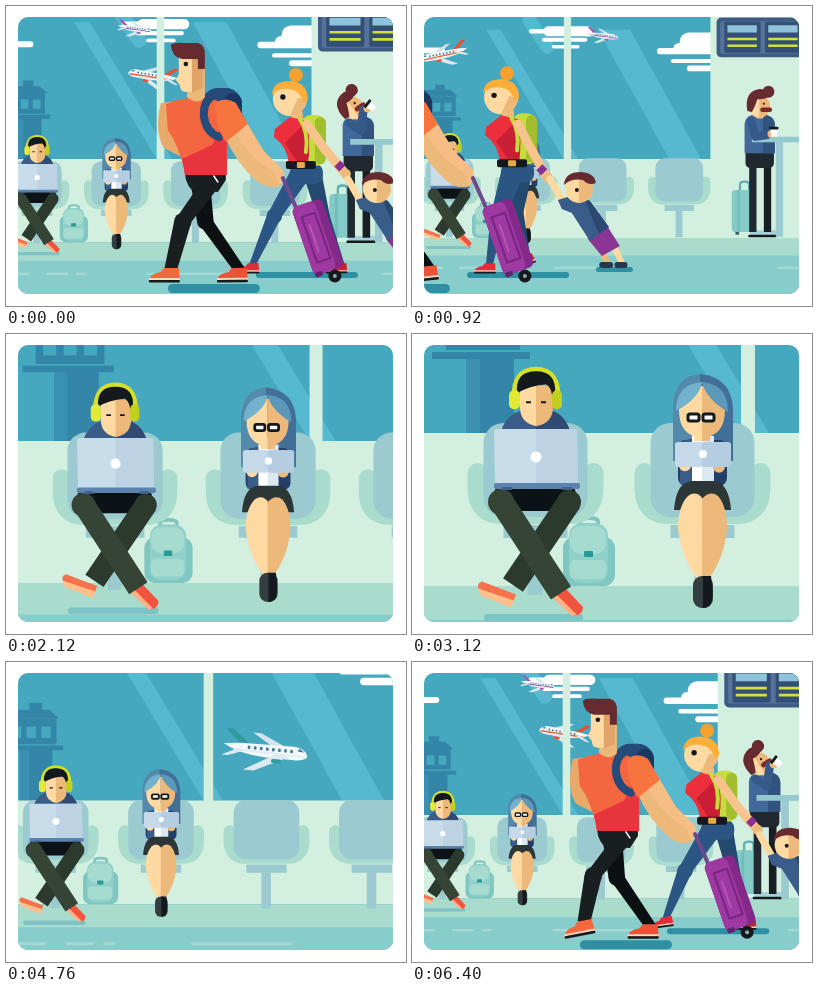
Animation, 400 px wide and 300 px high, one loop 6.44 s. Source, as an HTML page with a canvas:

```html
<!DOCTYPE html>
<html>
<head>
<meta charset="utf-8">
<title>Departure hall</title>
<style>
html, body { margin: 0; width: 100%; height: 100%; overflow: hidden; background: #fff; }
canvas { display: block; width: 400px; height: 300px; }
</style>
</head>
<body>
<canvas id="stage" width="400" height="300"></canvas>
<script>
const g = document.getElementById('stage').getContext('2d');
const LOOP = 6440, TAU = Math.PI * 2;
const { cos, sin, max, min } = Math;
const LIGHT = '#ffd9a2', TAN = '#ecb97a', BLACK = '#14191d', NAVY = '#3a5c88',
  WALL = '#d3efe0', MINT = '#a9dccd', CHAIR = '#9bcbd0', MAROON = '#672a2e', SHADE = '#2f8fa3';

// Drawing helpers
const fill = (c, d) => { g.fillStyle = c; g.fill(new Path2D(d)); };
const line = (c, w, d, cap = 'round') => {
  g.strokeStyle = c; g.lineWidth = w; g.lineCap = cap; g.lineJoin = 'round';
  g.stroke(new Path2D(d));
};
const box = (c, x, y, w, h, r = 0) => {
  g.fillStyle = c; g.beginPath(); g.roundRect(x, y, w, h, r); g.fill();
};
const dot = (c, x, y, r) => {
  g.fillStyle = c; g.beginPath(); g.arc(x, y, r, 0, TAU); g.fill();
};
const at = (x, y, draw, sx = 1, sy = sx, turn = 0) => {
  g.save(); g.translate(x, y); g.rotate(turn); g.scale(sx, sy); draw(); g.restore();
};
const mix = (a, b, p) => a + (b - a) * p;
const ease = (a, b, v) => { const p = min(1, max(0, (v - a) / (b - a))); return p * p * (3 - 2 * p); };

// Smooth cyclic tracks through the camera stops
const STOPS = [0, 920, 2120, 3120, 4080, 5480];
function track(v, t) {
  const n = STOPS.length;
  const time = i => STOPS[(i + n) % n] + LOOP * Math.floor(i / n);
  const value = i => v[(i + n) % n];
  const slope = i => (value(i + 1) - value(i)) / (time(i + 1) - time(i));
  const tangent = i => {
    const a = slope(i - 1), b = slope(i);
    return a * b > 0 ? 2 * a * b / (a + b) : 0;
  };
  let i = n - 1;
  while (STOPS[i] > t) i--;
  const h = time(i + 1) - time(i), p = (t - time(i)) / h, q = 1 - p;
  return value(i) * q * q * (1 + 2 * p) + value(i + 1) * p * p * (3 - 2 * p)
    + h * p * q * (tangent(i) * q - tangent(i + 1) * p);
}
const CAM = {
  wallS: [.545, .516, .928, 1, .837, .562],
  wallX: [-28.6, -17.9, -1.8, 0, -12.7, -33.8],
  wallY: [99, 101.9, 15.1, 0, 36.1, 96.4],
  skyX: [-20, -12, -1.8, 0, -20, -24],
  seatS: [.475, .4585, .916, 1, .809, .5],
  seatX: [-27.7, -19.1, -4.1, 0, -16.4, -35.5],
  seatY: [113, 111.5, 17, 0, 42, 110]
};

// Outside
function plane(paint, trim) {
  fill('#d5e4ec', 'M8-7L-22-25L-10-25L30-7Z');
  fill(trim, 'M-38-6L-62-27L-51-28L-26-8Z');
  fill('#f4f8f9', 'M61 3Q58-9 40-10L-38-8L-64-5Q-40 9 0 10L42 10Q58 9 61 3Z');
  line(paint, 3.5, 'M-48 2L57 4', 'butt');
  fill('#3f86a8', 'M48-8L56-3L46-3Z');
  for (let x = -28; x < 42; x += 9) box('#457a9d', x, -5, 4, 5, 1.5);
  fill('#dceaf0', 'M14 4L-32 31L-16 31L34 6Z');
  box(trim, 8, 11, 15, 6, 3);
  fill('#dceaf0', 'M-42 0L-66 12L-56 12L-30 2Z');
}
function tower() {
  const c = '#3486a8';
  box(c, 54, 20, 48, 90);
  box('#3a90b1', 54, 25, 14, 85);
  box(c, 68, -45, 19, 14);
  fill(c, 'M30-22L46-35L98-35L112-22Z');
  box(c, 34, -22, 74, 12);
  for (let x = 34; x < 108; x += 22) box(c, x, -12, 8, 24);
  box(c, 34, 7, 74, 9);
  box(c, 20, 18, 98, 7);
}
function clouds() {
  const bar = (x, y, w, h) => box('#fff', x, y, w, h, h / 2);
  bar(278, -158, 95, 19); bar(250, -153, 80, 9);
  bar(275, -136, 88, 8); bar(294, -122, 54, 7);
  bar(542, -146, 100, 36); bar(530, -126, 100, 20);
  bar(498, -116, 130, 12); bar(525, -95, 100, 8); bar(556, -82, 80, 11);
  bar(-40, -117, 127, 11);
}
function sky(t, u) {
  clouds();
  tower();
  at(273 + 130 * u, -140, () => plane('#8c4ba8', '#a555b5'), .5, .5, .12);
  const size = .74 - .2 * min(u, 0);
  at(306 - 240 * u, -53 - 55 * u, () => plane('#ef5a35', '#e8502f'),
    -size, size, .17 - .4 * max(0, u));
  const w = (t - 4080) / 1000;
  at(251 + 245 * w, -5 + 45 * w, () => plane('#e4eff3', '#2f9b9f'), 1, 1, .1);
}
function glints() {
  const c = '#56b9cf';
  fill(c, 'M178-152L206-152L357 99L329 99Z');
  fill(c, 'M395-152L457-152L595 99L533 99Z');
  line(c, 26, 'M262-170L297-118');
}

// Hall
function bag() {
  line('#80c4c0', 4, 'M168 192V187Q168 184 177 184Q186 184 186 187V192');
  box('#80c6c2', 151, 203, 52, 49, 11);
  box('#8fd0c8', 157, 189, 39, 60, 13);
  box('#a6dbcf', 158, 192, 36, 28, 11);
  box('#a6dbcf', 158, 226, 36, 19, 5);
  box('#279b96', 172, 217, 9, 6, 1);
}
function sign(t) {
  box('#3e5b83', 625, -175, 190, 77, 9);
  box('#557399', 632, -168, 183, 63, 4);
  const late = t > 5000 && t < 5950;
  for (const x of [640, 719]) {
    box('#344f76', x, -167, 70, 60, 3);
    box('#8fc3dc', x + 6, -160, 57, 14);
    box(late ? '#e33443' : '#d5df3a', x + 6, -136, 57, 5);
    box('#d5df3a', x + 6, -123, 57, 5);
  }
}
function hall(t) {
  box(WALL, 329, -250, 14, 360);
  box(WALL, 613, -250, 500, 360);
  box(WALL, -200, 99, 1300, 153);
  box(MINT, -200, 252, 1300, 35);
  box('#89cccc', -200, 286, 1300, 300);
  for (const [x, w] of [[-20, 116], [126, 41], [181, 18], [310, 150], [741, 80]])
    box('#a5dad4', x, 308, w, 4, 2);
  sign(t);
  bag();
}
function seat(x) {
  at(x, 0, () => {
    box(CHAIR, -8, 200, 15, 61);
    box(CHAIR, -32, 191, 64, 13);
    line(MINT, 20, 'M-58 139V154Q-58 180-33 180H33Q58 180 58 154V139');
    box(CHAIR, -52, 89, 104, 94, 20);
  });
}
function listener(t) {
  const nod = sin(t / LOOP * TAU * 10), tap = 3 * sin(t / LOOP * TAU * 5);
  box('#7fc3c6', 72, 280, 99, 7, 3.5);
  at(0, tap, () => {
    fill('#f4724c', 'M70 246L104 259L101 267L67 254Q64 248 70 246Z');
    fill('#ffc08c', 'M66 253L102 265L99 272L69 260Z');
  });
  fill('#f0543f', 'M141 264L153 254L171 273Q171 281 162 282Z');
  fill('#ffb184', 'M141 264L145 261L165 281L160 282Z');
  box('#0d1216', 82, 150, 82, 27, 10);
  line('#2c3a2d', 24, 'M158 167L101 251', 'butt');
  dot('#2c3a2d', 157, 168, 12);
  line('#354434', 24, 'M89 167L149 259', 'butt');
  dot('#354434', 89, 168, 13);
  fill(NAVY, 'M88 100Q94 79 112 76H137Q153 79 159 100Z');
  fill('#2f4b74', 'M124 76H137Q153 79 159 100H124Z');
  at(0, nod, () => {
    fill(LIGHT, 'M108 52H125V93Q108 90 108 74Z');
    fill(TAN, 'M124 52H141V74Q141 90 124 93Z');
    line('#d5df27', 5, 'M102 66Q101 36 124 36Q147 36 146 66');
    fill(BLACK, 'M105 60Q103 38 124 38Q145 38 143 61L140 62Q139 54 134 51Q116 53 105 60Z');
    box('#e2ea36', 97, 57, 11, 19, 5);
    box('#c3cf1d', 140, 57, 10, 19, 5);
    line(BLACK, 2, 'M114 69H119M129 69H134', 'butt');
  });
  fill('#c8dcea', 'M82 97Q82 95 85 95L163 95Q165 95 165 98L166 150H83Z');
  fill('#bdd3e4', 'M124 95H163Q165 95 165 98L166 150H124Z');
  dot('#fff', 124, 123, 5.5);
  box('#5b83ad', 82, 149, 86, 6, 2);
  box('#3d628d', 90, 153, 10, 3);
  box('#3d628d', 150, 153, 10, 3);
}
function reader(t) {
  fill('#5389ab', 'M261 127V72Q263 40 291 40V127Z');
  fill('#426f98', 'M288 40Q319 43 321 74V127H288Z');
  box('#233f68', 266, 106, 49, 46, 8);
  fill(NAVY, 'M268 150V112Q270 105 283 104L280 150Z');
  box('#fff', 280, 102, 11, 50);
  box('#dbe8ef', 290, 102, 12, 50);
  box(LIGHT, 282, 94, 9, 13);
  box(TAN, 290, 94, 8, 13);
  fill(LIGHT, 'M267 76Q267 53 290 52V104Q267 102 267 76Z');
  fill(TAN, 'M290 52Q313 53 313 76Q313 102 290 104Z');
  fill('#72b2cc', 'M264 77Q264 50 290 48Q288 64 264 77Z');
  fill('#5b98b9', 'M290 48Q316 50 316 78Q294 65 290 48Z');
  g.strokeStyle = BLACK; g.lineWidth = 3;
  for (const x of [276, 291]) {
    g.fillStyle = '#fff'; g.beginPath(); g.roundRect(x, 80, 11, 7, 2); g.fill(); g.stroke();
  }
  fill('#2d3636', 'M262 176Q264 148 280 147H302Q317 149 319 176Z');
  fill(LIGHT, 'M291 165Q284 156 276 162Q266 172 266 195Q270 226 287 247H291Z');
  fill(TAN, 'M290 165Q298 156 306 162Q315 172 315 195Q312 226 295 247H290Z');
  box('#343d40', 281, 242, 20, 32, 9);
  fill(BLACK, 'M291 242H299Q301 256 300 266Q298 274 291 274Z');
  const tap = sin(t / LOOP * TAU * 12) * .7;
  dot(LIGHT, 273, 132 + tap, 6);
  dot(TAN, 307, 132 - tap, 6);
  box('#c5d9e8', 263, 108, 28, 25, 3);
  box('#b4cde0', 290, 108, 29, 25, 3);
  dot('#fff', 291, 120, 4);
}
function drinker(u) {
  const p = ease(-.75, -.3, u) * (1 - ease(.35, .75, u));
  line('#5fb0b5', 2.5, 'M343 190V183Q343 180 348 180Q353 180 353 183V190');
  box('#84cac8', 334, 189, 24, 46, 4);
  box('#73bcbd', 340, 189, 3, 46);
  box('#3a5d6c', 338, 235, 4, 3);
  box('#a8d0dc', 354, 233, 15, 6, 2);
  box('#a8d0dc', 369, 233, 15, 6, 2);
  box(BLACK, 352, 238, 31, 2.5, 1);
  box('#20292f', 353, 155, 8, 80);
  box('#171f25', 369, 155, 8, 80);
  box('#20292f', 349, 145, 31, 20, 5);
  fill('#41689a', 'M348 149V117Q349 107 360 107H370Q380 108 381 118V149Z');
  fill('#31547f', 'M368 107Q381 108 381 118V149H368Z');
  at(364 - 4 * p, 101, () => {
    box(TAN, -4, 0, 9, 10, 2);
    dot(LIGHT, 0, -3, 12);
    fill(TAN, 'M0-15A12 12 0 0 1 12-3A12 12 0 0 1 0 9Z');
    fill(MAROON, 'M-13 2Q-17-20 1-22L14-20Q12-10-2-11Q-5-2-8 3Z');
    dot(MAROON, 10, -19, 6.5);
    dot(BLACK, 5, -6, 1.2);
    box('#7b2b2b', 1, -2, 13, 5, 2.5);
  }, 1, 1, -.6 * p);
  const x = mix(380, 377, p), y = mix(125, 96, p);
  box(CHAIR, 382, 134, 8, 106);
  box('#93c9cf', 356, 131, 60, 6);
  line('#355a89', 9, `M355 114L${mix(360, 367, p)} ${mix(131, 122, p)}L${x - 7} ${y + 4}`);
  dot(TAN, x - 3, y + 3, 4);
  at(x, y, () => {
    fill('#fff', 'M-4-3H4L3 6H-3Z');
    box(BLACK, -5, -5, 10, 3, 1);
  }, 1, 1, -.9 * p);
}

// Travellers
function leg(c, [thigh, ankle], [hip, top], bend, [mid, reach, ground], phase, lift, shoe, size) {
  const up = lift * max(0, -sin(phase));
  const x = mid - reach * cos(phase), y = ground - up;
  const kx = (hip + x) / 2 - bend - up * .6, ky = (top + y) / 2 - 2;
  const knee = (thigh + ankle) / 4, h = thigh / 2, a = ankle / 2;
  dot(c, kx, ky, knee);
  fill(c, `M${hip - h} ${top}L${kx - knee} ${ky}L${kx + knee} ${ky}L${hip + h} ${top}Z`);
  fill(c, `M${kx - knee} ${ky}L${x - a} ${y}L${x + a} ${y}L${kx + knee} ${ky}Z`);
  at(x, y, () => {
    fill(shoe, 'M-22 12Q-22 5-10 3L-7-1H8L9 12Z');
    box('#ffd9c2', -22, 9, 31, 2);
    box(BLACK, -22, 11, 31, 2.5, 1);
  }, size, size, -up * .05);
}
function suitcase() {
  line('#6c4a8e', 4, 'M277 172L293 208');
  dot(BLACK, 329, 270, 6.5);
  dot('#9aa7ad', 329, 270, 2);
  at(312, 231, () => {
    box('#84288a', -16, -36, 32, 72, 6);
    box('#9d39a0', -16, -36, 24, 72, 6);
    line('#7a2482', 2, 'M-9-24H5V24H-9Z');
    line('#b556b4', 2, 'M-4-14V14');
    box('#5f2470', -15, 33, 8, 5, 2);
  }, 1, 1, -.33);
}
function man(u) {
  const f = TAU * u / .9, stride = [199, 34, 263];
  box(SHADE, 162, 278, 92, 9, 4.5);
  leg('#0d1013', [20, 13], [194, 172], 14, stride, f + Math.PI, 14, '#ec5336', 1);
  leg('#191e21', [22, 13], [209, 172], 10, stride, f, 14, '#f4683f', 1);
  at(-2, -1 + cos(2 * f), () => {
    box('#264a7a', 198, 82, 40, 52, 16);
    box('#183761', 220, 87, 18, 45, 12);
    fill('#191e21', 'M181 160H222V174L214 186L188 184Q180 176 181 160Z');
    fill('#e8a96b', 'M157 97L172 95L171 122L184 139L178 151L160 142Q150 125 157 97Z');
    fill('#f4663f', 'M162 98Q177 91 203 91Q222 95 224 112L223 169L181 167Q176 141 164 124Z');
    fill('#e8343c', 'M223 112L223 169H181Q180 160 178 153L208 139Z');
    line('#264a7a', 8, 'M213 88Q199 93 200 110Q202 126 215 131');
    fill(TAN, 'M185 60H201V91Q194 100 183 91Z');
    fill(LIGHT, 'M175 49H190V86H182Q176 86 176 79L172 74L175 68Z');
    fill('#e0a468', 'M188 50H199V82L188 87Z');
    fill(MAROON, 'M167 39Q170 36 181 37H194Q202 39 201 50V63H194V53H178Q168 51 167 39Z');
    dot(BLACK, 182, 58, 2.3);
    fill('#f6be85', 'M221 130L241 113L260 145L279 164Q283 174 275 180Q264 184 252 174Q233 158 221 130Z');
    fill(TAN, 'M221 130L230 123Q245 152 271 167L275 180Q264 184 252 174Q233 158 221 130Z');
    fill('#f8743f', 'M211 97Q222 90 232 97L244 118L222 136Q213 125 211 97Z');
    line('#fff', 1.5, 'M210 170L214 176');
  });
  suitcase();
}
function mother(u, pull) {
  const f = TAU * u / .78, stride = [291, 44, 258];
  box(SHADE, 250, 266, 102, 6, 3);
  leg('#23496f', [19, 7], [306, 166], 3, stride, f + Math.PI, 9, '#c9222f', .7);
  leg('#2b5683', [24, 7], [296, 166], 3, stride, f, 9, '#e52b38', .7);
  at(0, cos(2 * f), () => {
    box('#2b5683', 284, 157, 33, 20, 8);
    box('#c4dc3c', 295, 108, 25, 51, 10);
    box('#a2be2c', 309, 110, 11, 47, 7);
    box(TAN, 285, 104, 12, 14, 3);
    fill('#ed2f3d', 'M269 122L284 110L301 114Q305 135 302 156H283Q281 139 268 130Z');
    fill('#c91f34', 'M301 114Q305 135 302 156H292L279 136Z');
    line('#c4dc3c', 4, 'M294 112Q303 126 300 145');
    box(BLACK, 280, 154, 30, 8, 2);
    box('#e2ad45', 291, 155, 8, 6, 1);
    dot(LIGHT, 284, 92, 17);
    fill(TAN, 'M284 109A17 17 0 0 0 301 92L292 91Z');
    dot('#f6a02e', 290, 68, 7);
    fill('#fcae3a', 'M266 88Q267 73 286 74Q302 76 302 93L297 96Q295 83 282 82Q272 81 266 88Z');
    dot(BLACK, 277, 90, 2.7);
  });
  const x = 340 + pull, y = 168 - pull * .4;
  line('#f6c48c', 9, `M301 118L${318 + pull / 2} 142L${x - 2} ${y - 2}`);
  line('#8b2f91', 7, `M${x - 9} ${y - 5}L${x - 3} ${y - 11}`, 'butt');
  dot(TAN, x, y, 5);
}
function child(u) {
  const f = TAU * u / .6, swing = 3 * sin(f);
  box(SHADE, 184, 261, 37, 5, 2.5);
  line(TAN, 6, `M189 242L${196 + swing} 257`);
  line(LIGHT, 6, `M201 238L${209 - swing} 256`);
  box('#26384b', 188 + swing, 256, 14, 6, 3);
  box('#26384b', 202 - swing, 256, 13, 6, 3);
  at(0, cos(2 * f) - 1, () => {
    fill('#8a3493', 'M176 233L196 221L208 240L190 250Z');
    line(LIGHT, 7, 'M138 173L150 194');
    fill(NAVY, 'M146 194L162 189L178 195L197 221L178 235L160 207L150 203Z');
    fill('#2b4871', 'M172 192L178 195L197 221L187 228Z');
    dot(LIGHT, 167, 183, 14);
    fill(TAN, 'M167 169A14 14 0 0 1 167 197Z');
    fill(MAROON, 'M152 179Q153 166 169 166Q183 167 184 177Q177 180 171 174Q160 172 152 179Z');
    dot(BLACK, 165, 184, 2);
  });
}
function travellers(u, zoom) {
  if (u < -1.1 || u > 2.4) return;
  // Steady pace with a slight lurch on every step
  const pace = v => -v * u + 18.7 * u * u + 8 * sin(TAU * u / .46);
  const lady = pace(229), kid = pace(239);
  at(150, 155, () => {
    g.translate(-150, -155);
    at(lady, 0, () => mother(u, kid - lady));
    at(204 + kid, 0, () => child(u));
    at(pace(252), 0, () => man(u));
  }, max(1, zoom));
}

function draw(t) {
  const u = (t > 4300 ? t - LOOP : t) / 1000;
  const c = {};
  for (const k in CAM) c[k] = track(CAM[k], t);
  g.clearRect(0, 0, 400, 300);
  g.save();
  g.beginPath(); g.roundRect(12, 11, 375, 277, 10); g.clip();
  box('#45a8bf', 0, 0, 400, 300);
  at(c.wallX, c.wallY, glints, c.wallS);
  at(c.skyX, c.wallY, () => sky(t, u), c.wallS);
  at(c.wallX, c.wallY, () => hall(t), c.wallS);
  at(c.seatX, c.seatY, () => {
    for (let i = 0; i < 4; i++) seat(123.5 + 167 * i);
    listener(t);
    reader(t);
    at(71, -220, () => drinker(u), 2);
  }, c.seatS);
  travellers(u, c.seatS / .475);
  g.restore();
}
const start = performance.now();
function tick() {
  draw((performance.now() - start) % LOOP);
  requestAnimationFrame(tick);
}
tick();
</script>
</body>
</html>
```
